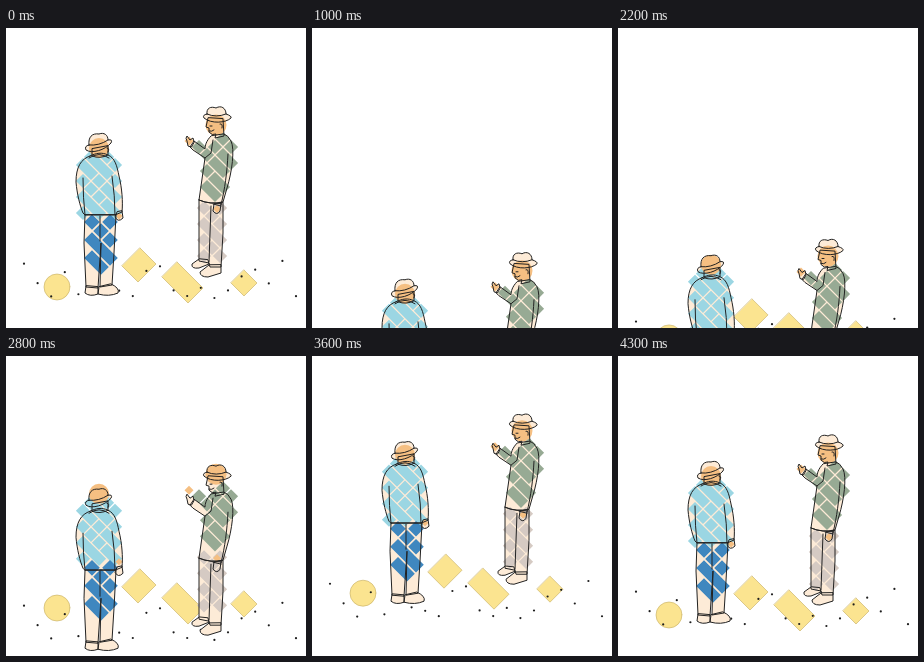
An HTML page with a canvas that plays this animation: 300 by 300 pixels, repeating every 8900 ms.

```html
<!DOCTYPE html>
<html>
<head>
<meta charset="utf-8">
<style>
html, body { margin: 0; height: 100%; overflow: hidden; background: #fff; }
canvas { display: block; width: 100vmin; height: 100vmin; }
</style>
</head>
<body>
<canvas></canvas>
<script>
const LOOP = 8900, STEP = 100, ENTER = 1700, SETTLED = 4300;
const ORANGE = '#f5bf82';
const canvas = document.querySelector('canvas');
const ctx = canvas.getContext('2d');
const ratio = window.devicePixelRatio || 1;
canvas.width = canvas.height = Math.min(innerWidth, innerHeight) * ratio;
const unit = canvas.width / 300;

let seed = 11;
const random = () => (seed = seed * 16807 % 2147483647) / 2147483647;

const sineOut = u => Math.sin(u * Math.PI / 2);
const sineInOut = u => (1 - Math.cos(u * Math.PI)) / 2;

function ease(t, t0, t1, from, to, easing = sineInOut) {
  const u = Math.min(1, Math.max(0, (t - t0) / (t1 - t0)));
  return from + (to - from) * easing(u);
}

// Lift a little, fall out of view, come back from `depth`, overshoot by `over` and settle
function bounce({ turn = 700, depth, over, peak }) {
  return t => {
    if (t < turn) return ease(t, 0, turn, 0, -13);
    if (t < ENTER) return ease(t, turn, turn + 550, -13, 265);
    if (t < peak) return ease(t, ENTER, peak, depth, -over, sineOut);
    return ease(t, peak, SETTLED, -over, 0);
  };
}

const moveGround = bounce({ turn: 500, depth: 116, over: 26, peak: 3350 });
const moveDots = bounce({ turn: 500, depth: 104, over: 8, peak: 3550 });

function diamond(path, x, y, half, stretch = 0) {
  path.moveTo(x, y - half);
  path.lineTo(x + half + stretch, y + stretch);
  path.lineTo(x + stretch, y + half + stretch);
  path.lineTo(x - half, y);
  path.closePath();
}

function square(x, y, half, stretch) {
  const path = new Path2D();
  diamond(path, x, y, half, stretch);
  return path;
}

function disc(x, y, r) {
  const path = new Path2D();
  path.arc(x, y, r, 0, 7);
  return path;
}

// Diagonal lattice inside an outline; some cells run into the next one
function patches(outline, x0, y0, step, half, rows) {
  const shape = new Path2D(outline), out = new Path2D();
  const inside = (x, y) => ctx.isPointInPath(shape, x, y);
  for (let row = -1; row < rows; row++)
    for (let col = -1; col < 6; col++) {
      const x = x0 + (2 * col + (row & 1)) * step, y = y0 + row * step;
      if (!inside(x, y)) continue;
      const joined = row < rows - 1 && inside(x + step, y + step) && random() < 0.4;
      diamond(out, x, y, half, joined ? step : 0);
    }
  return out;
}

const blueCoat = 'M84 128C75 131 70 139 70 154C71 166 74 178 77 185L79 187L109 187L116 184C117 174 116 160 113 148C111 138 109 130 102 127C96 124 90 125 84 128Z';
const bluePants = 'M79 187L78 215L80 259L92 260L95 215L94 259L106 257L108 225L110 187Z';
const greenCoat = 'M205 108C200 113 199 118 199 121L188 113L184 119L187 122L199 130L193 172Q205 177 217 174L221 160C226 144 229 121 225 113Q222 107 218 106Z';
const greyPants = 'M193 172L193 233L203 235L204 239L215 239L217 205L217 174Q205 177 193 172Z';

const men = [
  {
    shapes: [
      'M86 121L86 128Q94 131 102 127L102 118Z',
      bluePants,
      'M80 258L79 265Q84 269 92 266L92 259Z',
      'M93 259L92 266Q103 269 112 265Q114 260 105 256Z',
      'M111 184L109 189Q112 195 117 190L116 183Z',
      blueCoat,
      'M83 117C82 109 86 105 93 106C98 104 102 107 102 112Q107 111 105 115C99 122 86 126 80 122Q78 118 83 117Z'
    ],
    details: 'M83 117Q93 118 102 112M83 130Q93 123 103 130M77 150Q77 170 79 187M106 148Q109 168 109 187M101 120q3 0 1 4M94 188L94 213',
    paint: [
      ['#9bd6e3', patches(blueCoat, 77, 137, 8, 7.1, 7)],
      ['#3f87bf', patches(bluePants, 86, 194, 9, 7.8, 6)],
      [ORANGE, disc(93, 120, 10)],
      [ORANGE, square(113, 188, 3.5)]
    ],
    line: bounce({ depth: 221, over: 20, peak: 3550 }),
    color: bounce({ depth: 224, over: 23, peak: 3450 })
  },
  {
    shapes: [
      'M202 90L200 99L203 100L203 104Q206 108 210 106L209 110L218 108L217 91Z',
      greyPants,
      'M193 231L186 236Q185 241 193 240L203 236L202 232Z',
      'M203 237L194 244Q194 249 202 249L215 245L215 237Z',
      'M208 176L207 183Q211 188 214 183L215 176Z',
      'M188 114L187 110L184 112L181 108Q179 110 181 113L182 118L185 119Z',
      greenCoat,
      'M201 86C200 80 205 78 210 80C215 77 220 80 220 86Q226 88 225 90C220 95 205 96 198 90Q196 87 201 86Z'
    ],
    details: 'M201 86Q210 90 220 86M222 126C221 145 219 160 215 177M207 176L215 178M207 112L205 125L199 130M205 178L203 234M204 98l2 0M203 103q3 1 5-1M214 96q3-1 2 4',
    paint: [
      ['#97aa94', patches(greenCoat, 193, 119, 8, 7.1, 7)],
      ['#d5cac3', patches(greyPants, 198, 180, 8, 7.1, 7)],
      [ORANGE, disc(210, 97, 10.5)],
      [ORANGE, square(183, 113, 4.5)],
      [ORANGE, square(211, 181, 4)]
    ],
    line: bounce({ depth: 240, over: 21, peak: 3550 }),
    color: bounce({ depth: 250, over: 24, peak: 3450 })
  }
];
for (const man of men) {
  man.shapes = man.shapes.map(s => new Path2D(s));
  man.details = new Path2D(man.details);
}

const ground = [
  disc(51, 259, 13),
  square(134, 238, 18, -2),
  square(171, 249, 15, 11),
  square(238, 255, 13)
];

const dots = Array.from({ length: 21 }, (_, i) => disc(18 + 13.6 * i, 232 + 38 * random(), 1.1));

function shifted(y, draw) {
  ctx.save();
  ctx.translate(0, y);
  draw();
  ctx.restore();
}

function drawMan(man, t) {
  const y = man.line(t);
  ctx.fillStyle = '#fdebd7';
  shifted(y, () => man.shapes.forEach(s => ctx.fill(s)));
  shifted(man.color(t), () => {
    for (const [color, path] of man.paint) {
      ctx.fillStyle = color;
      ctx.fill(path);
    }
  });
  ctx.strokeStyle = '#222';
  ctx.lineWidth = 1;
  shifted(y, () => [...man.shapes, man.details].forEach(s => ctx.stroke(s)));
}

function draw(t) {
  ctx.setTransform(unit, 0, 0, unit, 0, 0);
  ctx.fillStyle = '#fff';
  ctx.fillRect(0, 0, 300, 300);
  ctx.lineJoin = ctx.lineCap = 'round';
  shifted(moveGround(t), () => {
    ctx.fillStyle = '#fbe490';
    ctx.strokeStyle = '#c4ad62';
    ctx.lineWidth = 0.6;
    ground.forEach(g => { ctx.fill(g); ctx.stroke(g); });
  });
  shifted(moveDots(t), () => {
    ctx.fillStyle = '#1d1d1d';
    dots.forEach(d => ctx.fill(d));
  });
  men.forEach(man => drawMan(man, t));
}

const start = performance.now();
function tick() {
  const t = (performance.now() - start) % LOOP;
  draw(Math.floor(t / STEP) * STEP);
  requestAnimationFrame(tick);
}
tick();
</script>
</body>
</html>
```
